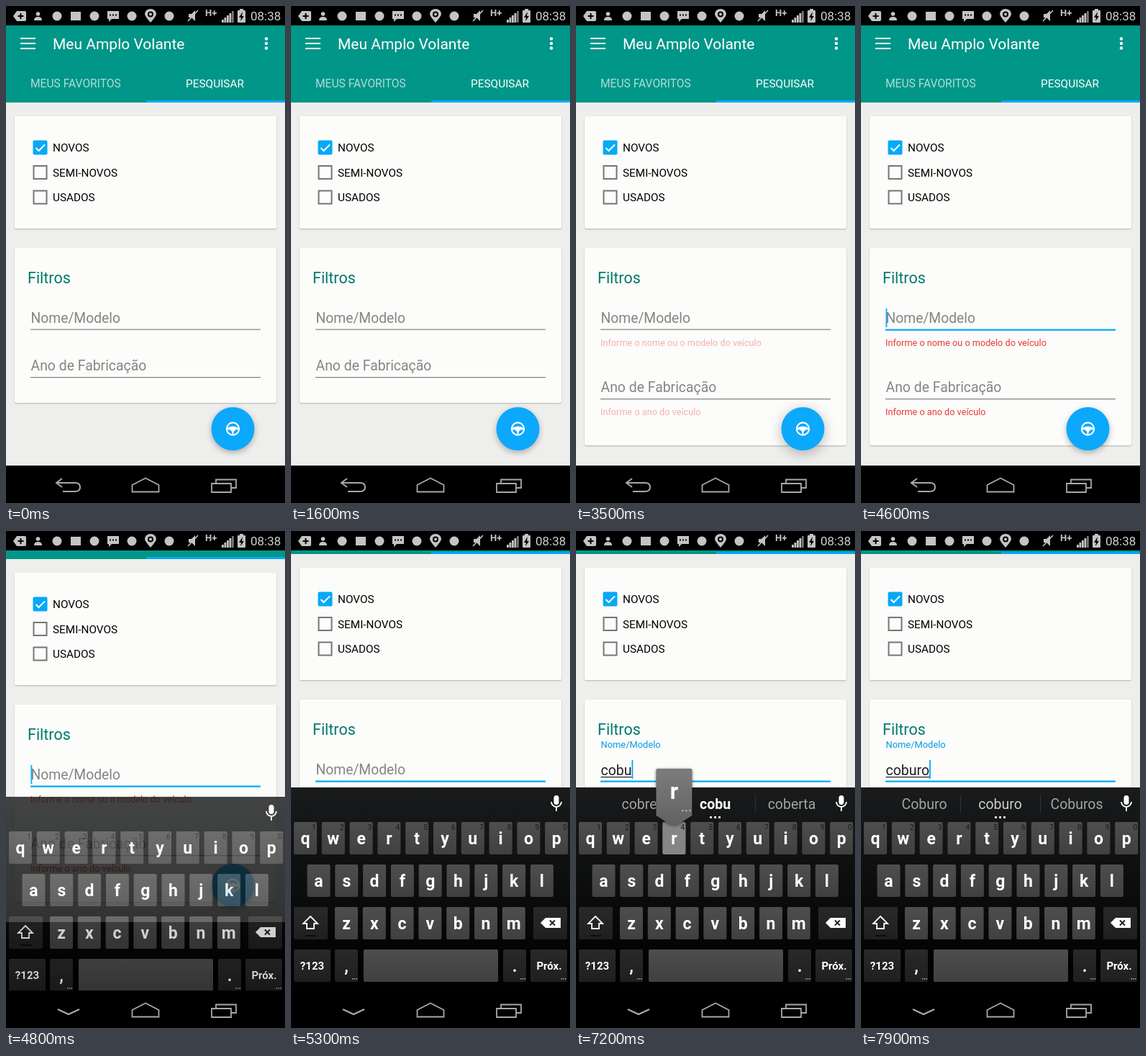
Recreate the animation shown at these times as an HTML page with a canvas. Size 388x690 px, loop 8000 ms.

```html
<!DOCTYPE html>
<html lang="pt">
<head>
<meta charset="utf-8">
<style>
html, body { margin: 0; height: 100%; overflow: hidden; background: #000; }
canvas { display: block; }
</style>
</head>
<body>
<canvas id="stage" width="388" height="690"></canvas>
<script>
const stage = document.getElementById('stage');
const layer = stage.cloneNode().getContext('2d');
let ctx = stage.getContext('2d');
const LOOP = 8000, BLUE = '#06a9f7', TEAL = '#009688', NAV_TOP = 638;
const ERROR_AT = 3300, FOCUS_AT = 4400, KEYBOARD_AT = 4650, PAN = 102;

// Key presses: letter, finger down, finger up, then the suggestions that follow.
const presses = [
  ['c', 6050, 6180, ['com', 'c', 'como']],
  ['o', 6420, 6530, ['com', 'co', 'como']],
  ['b', 6680, 6800, ['cobra', 'cob', 'cobre']],
  ['u', 6920, 7040, ['cobre', 'cobu', 'coberta']],
  ['r', 7150, 7310, ['cobre', 'cobur', 'cobrir']],
  ['o', 7450, 7580, ['Coburo', 'coburo', 'Coburos']]
];
const letterRows = [['qwertyuiop', 4, 404], ['asdfghjkl', 22.5, 463], ['zxcvbnm', 61, 522]];
const letterKeys = letterRows.flatMap(([letters, x, y]) =>
  [...letters].map((letter, i) => ({ letter, x: x + i * 38.8, y })));

const progress = (t, start, length) => Math.min(1, Math.max(0, (t - start) / length));
const easeOut = p => 1 - (1 - p) ** 3;

function rect(x, y, w, h, fill, radius = 0) {
  ctx.fillStyle = fill;
  ctx.beginPath();
  ctx.roundRect(x, y, w, h, radius);
  ctx.fill();
}

function disc(x, y, r, fill) {
  ctx.fillStyle = fill;
  ctx.beginPath();
  ctx.arc(x, y, r, 0, 7);
  ctx.fill();
}

function text(string, x, y, size, fill, align = 'left', weight = 400) {
  ctx.font = `${weight} ${size}px Roboto, sans-serif`;
  ctx.textAlign = align;
  ctx.fillStyle = fill;
  ctx.fillText(string, x, y);
}

function stroke(path, color, width) {
  ctx.strokeStyle = color;
  ctx.lineWidth = width;
  ctx.stroke(new Path2D(path));
}

function fillPath(path, color) {
  ctx.fillStyle = color;
  ctx.fill(new Path2D(path));
}

function verticalGradient(y0, y1, from, to) {
  const gradient = ctx.createLinearGradient(0, y0, 0, y1);
  gradient.addColorStop(0, from);
  gradient.addColorStop(1, to);
  return gradient;
}

function withShadow(color, blur, offset, draw) {
  ctx.save();
  ctx.shadowColor = color;
  ctx.shadowBlur = blur;
  ctx.shadowOffsetY = offset;
  draw();
  ctx.restore();
}

// Draws a group on its own layer, then fades it as a whole.
function withOpacity(alpha, draw) {
  const base = ctx;
  ctx = layer;
  ctx.clearRect(0, 0, 388, 690);
  draw();
  ctx = base;
  ctx.globalAlpha = alpha;
  ctx.drawImage(layer.canvas, 0, 0);
  ctx.globalAlpha = 1;
}

function ellipsis(x, y, step, size, color) {
  for (let i = -1; i < 2; i++) rect(x + i * step - size / 2, y, size, size, color);
}

const card = (y, height) => withShadow('rgba(0,0,0,.25)', 2, 1,
  () => rect(12, y, 364, height, '#fcfcfa', 2));

function drawHeader() {
  rect(0, 27, 388, 107, TEAL);
  for (const y of [44, 51, 58]) rect(20, y, 21, 2, '#fff');
  for (const y of [45.5, 52, 58.5]) disc(362, y, 2.2, '#fff');
  text('Meu Amplo Volante', 65, 60, 21, '#fff');
  text('MEUS FAVORITOS', 34, 113, 15.6, 'rgba(255,255,255,.68)');
  text('PESQUISAR', 250, 113, 15.4, '#fff');
  rect(195, 131, 193, 3, BLUE);
}

function drawChoices() {
  card(153, 156);
  ['NOVOS', 'SEMI-NOVOS', 'USADOS'].forEach((label, i) => {
    const y = 187 + i * 34.5;
    if (i === 0) {
      rect(37.5, y - .5, 20, 20, BLUE, 2);
      stroke('M41.5 197l4 4 8.5-8.5', '#fff', 2);
    } else {
      ctx.strokeStyle = '#757575';
      ctx.lineWidth = 2;
      ctx.strokeRect(38.5, y + .5, 18, 18);
    }
    text(label, 65, y + 15, 15.3, '#000');
  });
}

function drawFilters(t, typed, lastEdit) {
  const failed = t >= ERROR_AT, focused = t >= FOCUS_AT, shift = failed ? 30 : 0;
  card(336, failed ? 274 : 215);
  text('Filtros', 30, 385, 21.5, '#00796b');

  if (typed) {
    const rise = progress(t, presses[0][2], 170);
    ctx.globalAlpha = .35 + .65 * rise;
    text('Nome/Modelo', 34.5, 403 + 32 * (1 - rise), 12.9, '#039be5');
    ctx.globalAlpha = 1;
    text(typed, 34.5, 440.5, 19.5, '#222');
  } else {
    text('Nome/Modelo', 34.5, 439.5, 19.3, '#858585');
  }
  const typedWidth = typed ? ctx.measureText(typed).width : 0;
  if (typed) rect(34.5, 443, typedWidth, 1.3, '#222');
  if (focused && (t - lastEdit) % 1000 < 500) rect(34.5 + typedWidth, 420, 1.8, 26, BLUE);
  if (focused) rect(34, 448.6, 320, 2.2, BLUE);
  else rect(34, 448.5, 320, 1.2, '#858585');

  text('Ano de Fabricação', 34.5, 506 + shift, 19.4, '#858585');
  rect(34, 515 + shift, 320, 1.2, '#858585');

  ctx.globalAlpha = progress(t, 3400, 260);
  text('Informe o nome ou o modelo do veículo', 34, 472, 12.7, '#e53935');
  text('Informe o ano do veículo', 34, 568, 12.7, '#e53935');
  ctx.globalAlpha = 1;
}

function drawActionButton(t) {
  const lift = progress(t, 2900, 120) * (1 - progress(t, 3550, 150));
  withShadow('rgba(0,0,0,.28)', 9 + 9 * lift, 3 + lift,
    () => disc(315.5, 587, 30, '#0ba8fb'));
  const ripple = progress(t, 2950, 350);
  if (ripple > 0 && ripple < 1) {
    disc(315.5, 587, 30 * ripple, `rgba(255,255,255,${.25 * (1 - ripple)})`);
  }
  ctx.strokeStyle = '#fff';
  ctx.lineWidth = 2.2;
  ctx.beginPath();
  ctx.arc(315.5, 587, 8.6, 0, 7);
  ctx.stroke();
  fillPath('M307 586q8.5-5 17 0v2l-5 .5-2.5 3v4h-2v-4l-2.5-3-5-.5z', '#fff');
}

function clipToApp() {
  ctx.beginPath();
  ctx.rect(0, 27, 388, NAV_TOP - 27);
  ctx.clip();
}

function drawPage(t, typed, lastEdit) {
  ctx.save();
  ctx.translate(0, -Math.round(PAN * easeOut(progress(t, KEYBOARD_AT, 255))));
  clipToApp();
  rect(0, 27, 388, NAV_TOP - 27, '#eeeeec');
  drawHeader();
  drawChoices();
  drawFilters(t, typed, lastEdit);
  drawActionButton(t);
  ctx.restore();
}

function key(x, y, width, dark) {
  rect(x, y, width, 45, dark ? verticalGradient(y, y + 45, '#292929', '#1f1f1f')
    : verticalGradient(y, y + 45, '#4e4e4e', '#404040'), 2);
}

function drawSuggestions(typed) {
  const words = presses[typed.length - 1][3];
  rect(138, 367, 1, 24, '#303234');
  rect(249, 367, 1, 24, '#303234');
  words.forEach((word, i) => {
    const strong = i === 1 && typed.length === 4;
    text(word, [88, 193.5, 300][i], 386, 19.5, strong ? '#fff' : i === 1 ? '#ccc' : '#a4a4a4',
      'center', strong ? 700 : 400);
  });
  ellipsis(193.5, 396, 6, 3, '#ddd');
}

function drawKeyboard(t, typed, pressed) {
  ctx.save();
  clipToApp();
  ctx.translate(0, Math.round(186 * (1 - easeOut(progress(t, KEYBOARD_AT, 255)))));
  rect(0, 356, 388, 283, verticalGradient(355, 600, '#191b1c', '#020202'));
  if (typed) drawSuggestions(typed);

  // Microphone
  rect(365.5, 367, 7, 13, '#fff', 3.5);
  stroke('M362 376a7 7 0 0 0 14 0M369 383v6', '#fff', 1.8);

  letterKeys.forEach(({ letter, x, y }, i) => {
    key(x, y, 32, false);
    if (letter === pressed) rect(x, y, 32, 45, '#858585', 2);
    text(letter, x + 16, y + 31, 23, '#fff', 'center', 700);
    if (i < 10) text((i + 1) % 10, x + 31, y + 10.5, 10.5, '#1c1c1c', 'right');
  });

  key(4, 522, 47, true);
  stroke('M27 535l10 10h-5v7h-10v-7h-5z', '#fff', 1.8);
  rect(20, 561, 15, 2, '#0b0b0b');
  key(337, 522, 47, true);
  fillPath('M347 544l7-7h21v14h-21z', '#fff');
  stroke('M360 540.5l7 7m0-7l-7 7', '#222', 2);

  key(4, 581, 51, true);
  text('?123', 29.5, 609, 15, '#fff', 'center', 700);
  key(61, 581, 32, true);
  text(',', 77, 612, 23, '#fff', 'center', 700);
  key(101, 581, 187, false);
  key(295, 581, 32, true);
  text('.', 311, 612, 23, '#fff', 'center', 700);
  key(333, 581, 51, true);
  text('Próx.', 359, 609, 15, '#fff', 'center', 700);
  for (const x of [88.5, 322.5, 379]) ellipsis(x, 621, 2.7, 1.4, '#bbb');
  ctx.restore();
}

function drawPopup(letter) {
  const { x, y } = letterKeys.find(k => k.letter === letter);
  ctx.save();
  ctx.translate(x + 16, y - 74);
  withShadow('rgba(0,0,0,.5)', 4, 1, () => fillPath(
    'M-23 0h46q2 0 2 2v63l-17 11q-8 4-16 0l-17-11v-63q0-2 2-2z',
    verticalGradient(0, 78, '#7c7c7c', '#626262')));
  text(letter, 0, 42, 31, '#fff', 'center', 700);
  ellipsis(17, 57, 5, 2.4, '#aaa');
  ctx.restore();
}

function drawStatusBar() {
  const ink = '#c4c4c4';
  rect(0, 0, 388, 27, '#000');
  fillPath('M10 14l5-7h11q2 0 2 2v10q0 2-2 2h-11z', ink);
  stroke('M20.5 10v8m-4-4h8', '#000', 2);
  disc(44.5, 11, 2.8, ink);
  fillPath('M39 20q0-5 5.5-5t5.5 5z', ink);
  disc(71, 14, 6.5, ink);
  rect(90, 8, 14, 12, ink);
  for (const x of [123, 175, 227]) disc(x, 14, 6.5, ink);
  fillPath('M141 7h16v11h-10l-4 4v-4h-2z', ink);
  ellipsis(149, 11.5, 4, 2, '#000');
  fillPath('M201 23q-8-9-8-12a8 7 0 0 1 16 0q0 3-8 12z', ink);
  disc(201, 11.5, 4, '#000');
  disc(201, 11.5, 2, ink);
  fillPath('M254 11h4l5-5v15l-5-5h-4z', ink);
  stroke('M253 21l14-15', ink, 1.6);
  text('H+', 277, 14, 13, ink, 'left', 700);
  for (let i = 0; i < 5; i++) rect(300 + i * 3.5, 19 - i * 3, 2.8, 4 + i * 3, i < 4 ? ink : '#777');
  rect(325, 4, 5, 3, ink);
  rect(322, 6, 11, 17, ink, 1);
  fillPath('M329 8l-5 8h3l-1 5 5-7h-3z', '#000');
  text('08:38', 340, 20, 17, '#d0d0d0');
}

function drawNavigation(keyboardOpen) {
  const ink = '#a8a8a8';
  rect(0, NAV_TOP, 388, 52, '#000');
  if (keyboardOpen) stroke('M72 664l15 7 15-7', ink, 2.4);
  else stroke('M78 656l-8 6 8 6M71 662h25q7 0 7 6t-7 6h-17', ink, 2);
  stroke('M175.5 665l18.5-9.5 18.5 9.5v9.5h-37z', ink, 1.8);
  stroke('M286 663h27v12h-27zM292 663v-5.5h28v11.5h-7', ink, 1.8);
}

function render(now) {
  const t = now % LOOP;
  const done = presses.filter(press => t >= press[2]);
  const typed = done.map(press => press[0]).join('');
  const lastEdit = done.length ? done[done.length - 1][2] : FOCUS_AT;
  const active = presses.find(press => t >= press[1] && t < press[2]);

  rect(0, 0, 388, 690, '#000');
  drawPage(t, typed, lastEdit);
  withOpacity(progress(t, KEYBOARD_AT, 185), () => drawKeyboard(t, typed, active && active[0]));
  if (active) drawPopup(active[0]);
  drawStatusBar();
  drawNavigation(t >= KEYBOARD_AT);
  requestAnimationFrame(render);
}
requestAnimationFrame(render);
</script>
</body>
</html>
```
